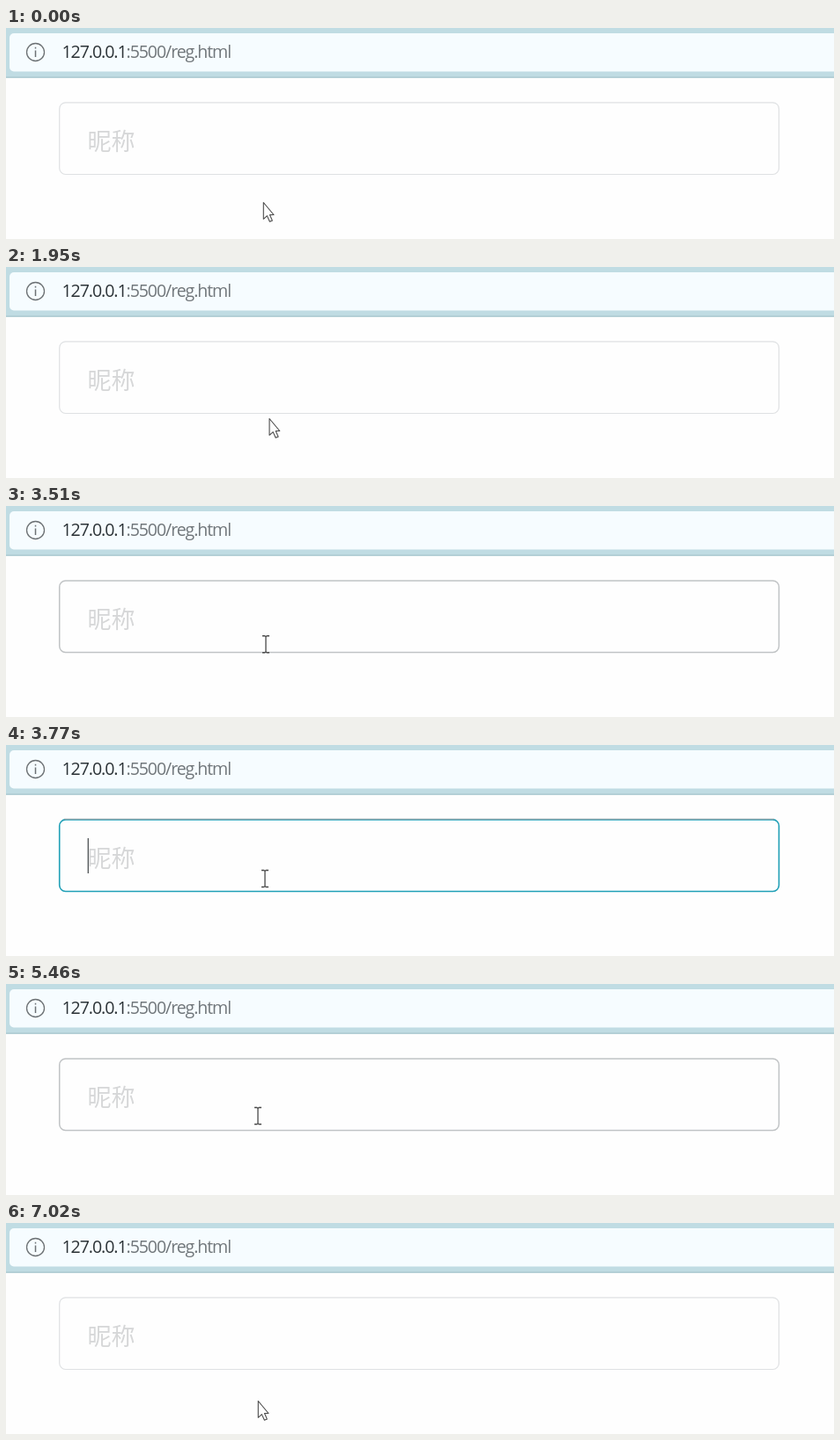
An HTML page for the animation above (7150 ms loop, 940x240 px).

```html
<!DOCTYPE html>
<html lang="zh-CN">
<head>
<meta charset="utf-8">
<title>昵称</title>
<style>
  html, body { margin: 0; width: 100%; height: 100%; overflow: hidden; background: #fefefe; }
  svg { display: block; width: 940px; height: 240px; }
  .url { font: 19.5px "Open Sans", "Noto Sans", sans-serif; letter-spacing: -1.05px; fill: #70767a; }
  .host { font-weight: 500; fill: #2b3236; }
  .hint { font: 500 27px "Noto Sans CJK SC", "Noto Sans CJK", sans-serif; fill: #d6d7d8; }
</style>
</head>
<body>
<svg viewBox="0 0 940 240">
  <rect width="940" height="57" fill="#c0dce3"/>
  <rect y="55" width="940" height="2" fill="#b3cfd6"/>
  <rect x="4" y="6" width="960" height="43.5" rx="5" fill="#f6fcff"/>

  <g fill="none" stroke="#6c7174">
    <circle cx="33.5" cy="27.5" r="10" stroke-width="1.3"/>
    <path d="M33.5 25.5V33M33.5 21.7V23.5" stroke-width="1.5"/>
  </g>
  <text class="url" x="63.5" y="34"><tspan class="host">127.0.0.1</tspan>:5500/reg.html</text>

  <rect id="box" x="60.7" y="84.9" width="816.8" height="81.6" rx="7" fill="none"/>
  <path id="edge" d="M66 84.4H872" stroke="#86a2a9" stroke-width="1.1"/>
  <text class="hint" x="92.5" y="138.5">昵称</text>
  <path id="caret" d="M93.3 106V146" stroke="#5a5e60" stroke-width="1.4"/>

  <path id="arrow" d="M.3 .5V19.3L4.4 15.6L7.4 22.3L10.4 21.1L7.5 14.5H12Z"
        fill="#fff" stroke="#4a4a4a" stroke-width="1.1" stroke-linejoin="round"/>
  <path id="beam" d="M-4 -9.5H-1.2L0 -8.6L1.2 -9.5H4M0 -8.6V8.6M-4 9.5H-1.2L0 8.6L1.2 9.5H4"
        fill="none" stroke="#4a4a4a" stroke-width="1.3"/>
</svg>
<script>
const LOOP = 7150, STEP = 130, BLINK = 520;

const home = { x: 292, y: 198 };
const moves = [
  { at: 0, ms: 780, x: 292, y: 148 },
  { at: 1170, ms: 520, x: 298, y: 199 },
  { at: 1690, ms: 520, x: 299, y: 163 },
  { at: 2730, ms: 130, x: 298, y: 173 },
  { at: 3380, ms: 260, x: 294, y: 152 },
  { at: 4550, ms: 520, x: 288, y: 193 },
  { at: 5070, ms: 390, x: 286, y: 150 },
  { at: 5980, ms: 820, x: 286, y: 202 }
];
const focusSpans = [{ from: 3640, to: 5070 }, { from: 5590, to: 6760 }];
const borders = {
  idle: { color: "#dfe1e3", width: 1.2 },
  hover: { color: "#c0c3c5", width: 1.5 },
  focus: { color: "#1f9fb6", width: 1.6 }
};

const el = id => document.getElementById(id);
const [box, edge, caret, arrow, beam] = ["box", "edge", "caret", "arrow", "beam"].map(el);
const show = (node, on) => node.setAttribute("visibility", on ? "visible" : "hidden");
const easeOut = p => 1 - (1 - p) ** 2;

function pointerAt(t) {
  let { x, y } = home;
  for (const m of moves) {
    const p = easeOut(Math.min(1, Math.max(0, (t - m.at) / m.ms)));
    x += (m.x - x) * p;
    y += (m.y - y) * p;
  }
  return { x, y };
}

function draw(t) {
  const { x, y } = pointerAt(t);
  const inside = y < 167;
  const span = focusSpans.find(s => t >= s.from && t < s.to);
  const border = borders[span ? "focus" : inside ? "hover" : "idle"];

  box.setAttribute("stroke", border.color);
  box.setAttribute("stroke-width", border.width);
  show(edge, span);
  show(caret, span && (t - span.from) % (2 * BLINK) < BLINK);
  show(arrow, !inside);
  show(beam, inside);
  (inside ? beam : arrow).setAttribute("transform", `translate(${x} ${y})`);
}

const start = performance.now();
function tick() {
  const t = (performance.now() - start) % LOOP;
  draw(Math.floor(t / STEP) * STEP);
  requestAnimationFrame(tick);
}
tick();
</script>
</body>
</html>
```
